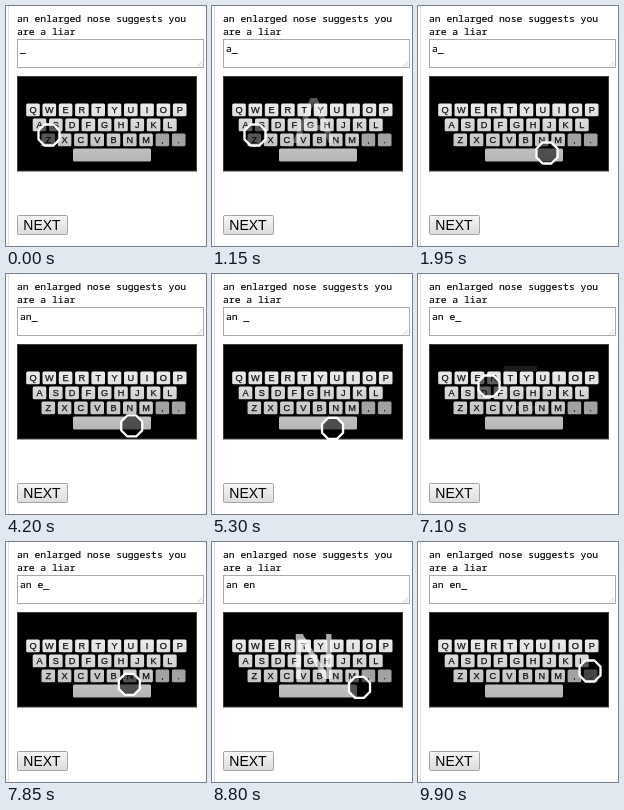
Recreate the animation shown at these times as an HTML page. Size 200 px wide and 240 px high, loop 10000 ms.

```html
<!DOCTYPE html>
<html lang="en">
<head>
<meta charset="utf-8">
<title>Typing with a pointer</title>
<style>
html, body { margin: 0; width: 100%; height: 100%; overflow: hidden; background: #fff; }
svg { display: block; width: 200px; height: 240px; }
.mono { font: 9.72px "Noto Sans Mono", "DejaVu Sans Mono", monospace; white-space: pre; fill: #000; stroke: #000; stroke-width: .15; }
.sans { font-family: "Liberation Sans", Arial, sans-serif; }
.mid { text-anchor: middle; }
</style>
</head>
<body>
<svg viewBox="0 0 200 240" xmlns="http://www.w3.org/2000/svg">
  <defs>
    <linearGradient id="cap" gradientUnits="userSpaceOnUse" x1="0" y1="97" x2="0" y2="156">
      <stop offset="0" stop-color="#ececec"/>
      <stop offset="1" stop-color="#b4b4b4"/>
    </linearGradient>
    <linearGradient id="button" x2="0" y2="1">
      <stop offset="0" stop-color="#f6f6f6"/>
      <stop offset="1" stop-color="#dcdcdc"/>
    </linearGradient>
  </defs>
  <rect width="200" height="240" fill="#fff"/>
  <path d="M2.5 0V240" stroke="#e0e0e0"/>
  <text class="mono" x="11" y="16">an enlarged nose suggests you</text>
  <text class="mono" x="11" y="28.5">are a liar</text>
  <rect x="11.5" y="33.5" width="186" height="28" fill="#fff" stroke="#a9a9a9"/>
  <path d="M191 60.5l5-5M194 60.5l2-2" stroke="#aaa" stroke-width=".6"/>
  <text class="mono" id="typed" x="14" y="46"></text>
  <rect x="11.5" y="70.5" width="179" height="94.5" fill="#000" stroke="#3c3c3c"/>
  <g id="keys" class="sans mid"></g>
  <text id="flash" class="sans mid" x="101.5" y="137" font-size="64" fill="#fff"></text>
  <path id="ring" d="M-4.4-10.5H4.4L10.5-4.4V4.4L4.4 10.5H-4.4L-10.5 4.4V-4.4Z"
    fill="#000" fill-opacity=".58" stroke="#fff" stroke-width="2.3" stroke-linejoin="round"/>
  <rect x="11.5" y="209.5" width="50" height="19" rx="1" fill="url(#button)" stroke="#a4a4a4"/>
  <text class="sans mid" x="36" y="224" font-size="14" fill="#000">NEXT</text>
</svg>
<script>
const LOOP = 10000, STEP = 50, FADE = 450;
const $ = id => document.getElementById(id);

// time, typed character
const strokes = [[850, "a"], [3250, "n"], [5100, " "], [6700, "e"], [8650, "n"]];

// start, end, then the pointer's start, bend and end points
const moves = [
  [1500, 1950, [43, 129], [86, 140], [129, 147]],
  [2300, 2450, [129, 147], [130, 147], [131, 146]],
  [3750, 4500, [131, 146], [125, 148], [125, 158]],
  [5150, 6000, [125, 158], [98, 136], [71, 112]],
  [7400, 8000, [71, 112.5], [102, 133], [133, 147]],
  [8500, 9400, [133, 147], [164, 146], [172, 129]]
];

function buildKeys() {
  const rows = [["QWERTYUIOP", 27, 97.4], ["ASDFGHJKL", 33.5, 112.4], ["ZXCVBNM,.", 42.3, 127.4]];
  let out = "";
  for (const [chars, x0, y] of rows) {
    [...chars].forEach((c, i) => {
      const x = x0 + i * 16.3, letter = c >= "A";
      out += `<rect x="${x - 6.8}" y="${y}" width="13.6" height="12.8" rx="1.5" fill="${letter ? "url(#cap)" : "#a2a2a2"}"/>` +
        `<text x="${x}" y="${y + 9.7}" font-size="${letter ? 9.2 : 8}" stroke="#111" stroke-width=".25" fill="#111">${c}</text>`;
    });
  }
  out += '<rect x="67" y="142.4" width="78" height="13.2" rx="1.5" fill="url(#cap)"/>';
  $("keys").innerHTML = out;
}

function pointerAt(t) {
  const move = moves.filter(m => t >= m[0]).pop() || moves[0];
  const [start, end, a, b, c] = move;
  const p = Math.min(1, Math.max(0, (t - start) / (end - start)));
  const u = p * p * (3 - 2 * p), v = 1 - u;
  return a.map((n, i) => v * v * n + 2 * u * v * b[i] + u * u * c[i]);
}

function draw(time) {
  const t = Math.floor((time % LOOP) / STEP) * STEP;
  const done = strokes.filter(s => t >= s[0]);
  const caret = (t + 150) % 1000 < 500 ? "_" : "";
  $("typed").textContent = done.map(s => s[1]).join("") + caret;

  const last = done[done.length - 1];
  const glow = last ? Math.max(0, 1 - (t - last[0]) / FADE) : 0;
  $("flash").textContent = last ? last[1].toUpperCase() : "";
  $("flash").setAttribute("opacity", glow);

  $("ring").setAttribute("transform", `translate(${pointerAt(t)})`);
}

buildKeys();
const origin = performance.now();
function tick() {
  draw(performance.now() - origin);
  requestAnimationFrame(tick);
}
tick();
</script>
</body>
</html>
```
